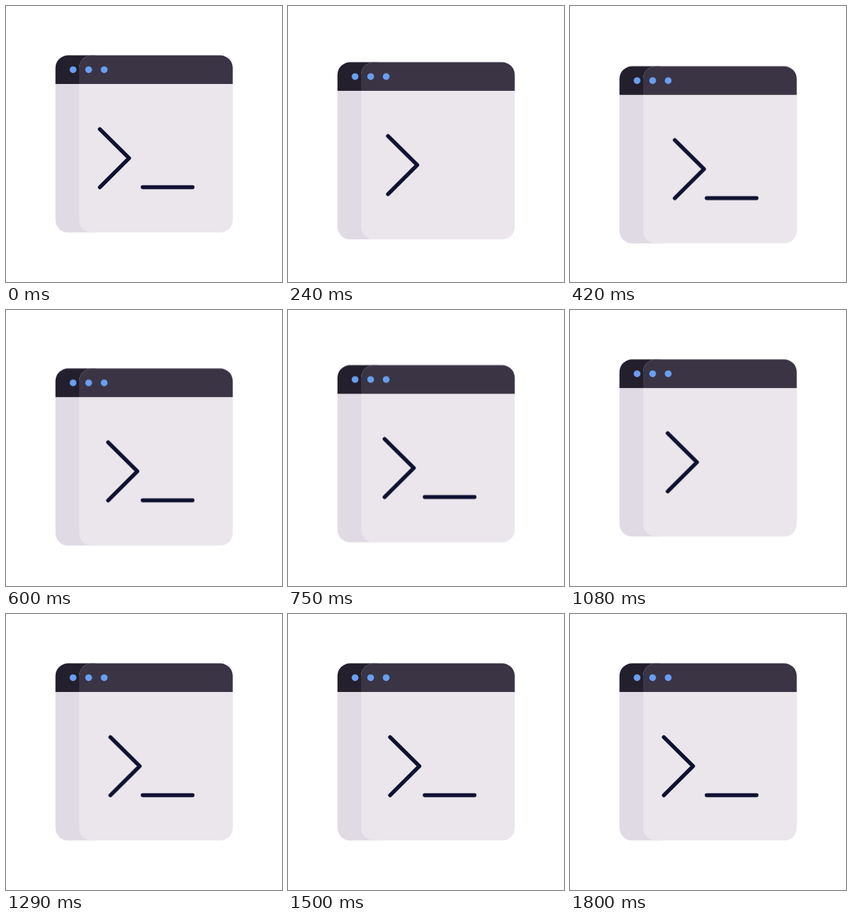
An HTML page without scripts for the animation above (1830 ms loop, 400 by 400 pixels).

```html
<!DOCTYPE html>
<html lang="en">
<head>
<meta charset="utf-8">
<title>Terminal window</title>
<style>
  html, body { margin: 0; width: 100%; height: 100%; overflow: hidden; background: #fff; }
  svg { display: block; width: 100vw; height: 100vh; }

  .window, .prompt { animation: 1830ms cubic-bezier(.364, 0, .636, 1) infinite; }
  .window { animation-name: bob; }
  .prompt { animation-name: nudge; }
  .cursor { animation: blink 1830ms step-end infinite; }
  .ink { fill: none; stroke: #0f1131; stroke-width: 5.6; stroke-linecap: round; stroke-linejoin: round; }

  /* down until 415 ms, back up by 1115 ms */
  @keyframes bob {
    0%, 60.93%, 100% { transform: translateY(0); }
    22.68% { transform: translateY(15.8px); }
  }
  /* two 900 ms swings, then a short rest */
  @keyframes nudge {
    0%, 49.18%, 98.36%, 100% { transform: translateX(0); }
    24.59%, 73.77% { transform: translateX(16px); }
  }
  @keyframes blink {
    0%, 20.4%, 69.6% { visibility: visible; }
    9.8%, 59% { visibility: hidden; }
  }
</style>
</head>
<body>
<svg viewBox="0 0 400 400">
  <defs>
    <clipPath id="side"><path d="M130 71.5H90a18.3 18.3 0 0 0-18.3 18.3V310a18.3 18.3 0 0 0 18.3 18.3h40z"/></clipPath>
    <clipPath id="front"><rect x="106" y="71.5" width="222.6" height="256.8" rx="18.3"/></clipPath>
  </defs>
  <g class="window">
    <g clip-path="url(#side)">
      <rect x="70" y="70" width="60" height="260" fill="#e0dae5"/>
      <rect x="70" y="70" width="60" height="43" fill="#231f2c"/>
    </g>
    <g clip-path="url(#front)">
      <rect x="105" y="70" width="225" height="260" fill="#eae6ec"/>
      <rect x="105" y="70" width="225" height="43" fill="#3a3445"/>
    </g>
    <g fill="#689ff0">
      <circle cx="97.2" cy="92.3" r="4.9"/>
      <circle cx="119.8" cy="92.3" r="4.9"/>
      <circle cx="142.3" cy="92.3" r="4.9"/>
    </g>
    <path class="ink prompt" d="M136 178.4L178.4 220.5L136 262.8"/>
    <path class="ink cursor" d="M198.1 262.6H270.4"/>
  </g>
</svg>
</body>
</html>
```
